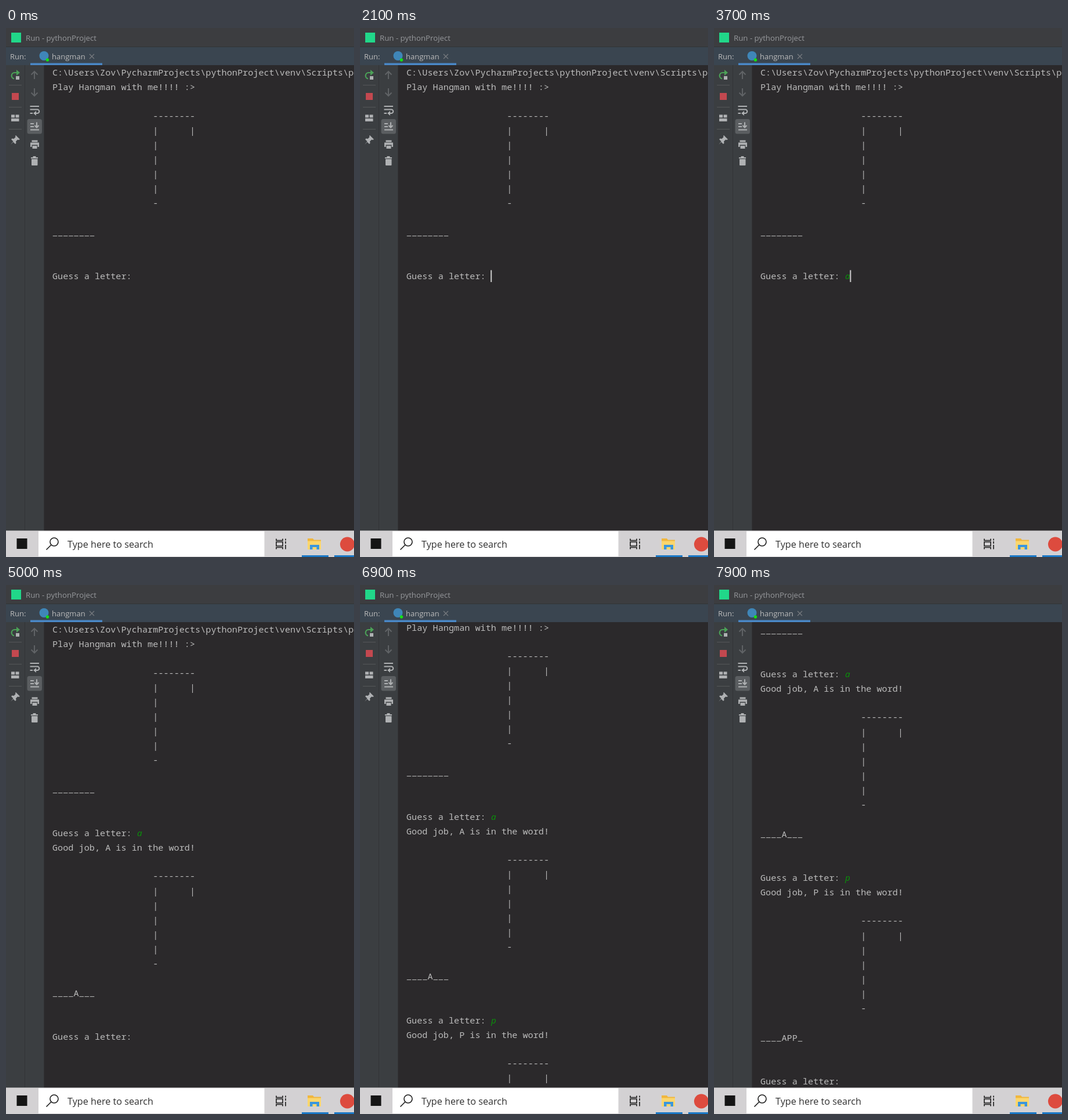
Recreate the animation shown at these times as an HTML page. Size 600 px wide and 912 px high, loop 8000 ms.

```html
<!DOCTYPE html>
<html lang="en">
<head>
<meta charset="utf-8">
<title>Hangman console</title>
<style>
  html, body { margin: 0; height: 100%; overflow: hidden; background: #3c3f41; }
  #stage { display: block; width: 100vw; height: 100vh; }
  text { white-space: pre; fill: #bbb; font: 13px "Open Sans", "Noto Sans", sans-serif; }
  #rows text { font: 15.2px "Noto Sans Mono", "DejaVu Sans Mono", monospace; }
  #rows .typed { fill: #0b8f0b; font: italic 15.2px "Noto Sans", sans-serif; }
  #rows .blank { font-size: 12.5px; letter-spacing: 1.62px; transform: translate(.8px, -1.5px); }
  #rows .gallows { transform: translateY(-1px); }
  .line { fill: none; stroke: #afb1b3; stroke-width: 2; }
  .solid { fill: #afb1b3; }
  .dim { stroke: #606366; }
</style>
</head>
<body>
<svg id="stage" viewBox="0 0 600 912">
  <!-- window frame -->
  <rect width="600" height="912" fill="#3b3e41"/>
  <rect width="600" height="33" fill="#3c3d40"/>
  <rect y="33" width="600" height="31" fill="#3a4550"/>
  <path d="M0 32.500H600M32.500 64V866" stroke="#323437"/>
  <rect x="9" y="8" width="17" height="17" fill="#21d789"/>
  <text x="34" y="22" style="font-size:13.25px;fill:#96989b">Run - pythonProject</text>
  <text x="7" y="54">Run:</text>
  <circle cx="65.5" cy="48" r="8" fill="#3f86b8"/>
  <circle cx="71.5" cy="55" r="2.7" fill="#14e014"/>
  <text x="79" y="54">hangman</text>
  <path d="M144 45l8 8m0-8l-8 8" stroke="#777b7f" stroke-width="1.2"/>
  <rect x="42" y="60.5" width="124" height="3.5" fill="#4a88c7"/>

  <!-- console -->
  <rect x="65.5" y="64" width="535" height="803" fill="#2b292b"/>
  <svg y="64" width="600" height="803" viewBox="0 64 600 803">
    <g id="rows"></g>
  </svg>

  <!-- tool buttons -->
  <path d="M5 98.500H27M5 136.500H27M5 174.500H27" stroke="#555759"/>
  <path d="M14 87.500A5.300 5.300 0 0 1 14.500 77H19" fill="none" stroke="#4ba157" stroke-width="2.2"/>
  <path d="M18 72l6 5-6 5z" fill="#4ba157"/>
  <rect x="17" y="83" width="6" height="6" class="solid"/>
  <rect x="10" y="112" width="12" height="12" fill="#c3484f"/>
  <path d="M9 149.500h6v5h-6zM16.500 149.500h6v5h-6zM9 156h13.500v5H9z" class="solid"/>
  <path d="M17 185l7 7-2 1-2-.5-3 3 .5 3-1.500 1.500-3.500-3.500L8 201l4.500-5.500L9 192l1.500-1.500 3 .5 3-3-.5-2z" class="solid"/>
  <path d="M49 88V75m-5.500 5.500L49 75l5.500 5.500M49 104v13m-5.500-5.500L49 117l5.500-5.500" class="line dim"/>
  <path d="M41.500 135H57M41.500 140.500H54a3 3 0 0 1 0 6.500H50M41.500 147H46" class="line"/>
  <path d="M52 143v8l-5-4z" class="solid"/>
  <rect x="36.5" y="157" width="25.5" height="25.5" rx="3.5" fill="#5b5e61"/>
  <path d="M42 165H48M42 170H48M42 175.500H57M53 162.500V171M49.500 168l3.500 3.500 3.500-3.500" class="line"/>
  <path d="M44.500 193.500h10v3h-10zM42 197.500h15v7.500h-2.500v-3.500h-10v3.500H42zM45.500 203h8v5h-8z" class="solid"/>
  <path d="M43 223h12v2H43zM46.500 221h5v2h-5zM44 226h10.500v10q0 1-1 1h-8.500q-1 0-1-1z" class="solid"/>

  <!-- taskbar -->
  <rect y="866.5" width="600" height="45.5" fill="#d3d1d3"/>
  <rect x="56" y="867.5" width="389.5" height="43.5" fill="#fff"/>
  <rect x="18.5" y="880" width="18" height="18" fill="#151515"/>
  <g fill="none" stroke="#1b1b1b" stroke-width="1.6">
    <circle cx="83" cy="886" r="7"/>
    <path d="M78 891l-8.500 8.500"/>
    <path d="M466 880.500v3h11v-3M466 886h11v7h-11zM466 898.500v-3h11v3M482 880.500v3M482 885v4M482 891v7.500"/>
  </g>
  <text x="106" y="896" style="font-size:16.2px;fill:#303030">Type here to search</text>
  <path d="M520 880h9l2 2.500h12V899h-23z" fill="#f0b73f"/>
  <path d="M520 884.500h23V899h-23z" fill="#fbd66d"/>
  <path d="M524 899v-8h16v8h-4.500v-4h-7v4z" fill="#3a96dd"/>
  <circle cx="588.5" cy="890" r="12.5" fill="#dd4b3e"/>
  <path d="M510 909h46v3h-46zM566 909h34v3h-34z" fill="#1b78c6"/>
</svg>
<script>
const LOOP = 8000, PITCH = 25.07, LEFT = 80, COLUMN = 9.12, PROMPT = 16;
const SCROLL = { start: 6800, length: 340, distance: 274 };
const NS = 'http://www.w3.org/2000/svg';
const rows = document.getElementById('rows');
const parts = [];

function add(name, attrs, from = 0) {
  const node = document.createElementNS(NS, name);
  for (const key in attrs) node.setAttribute(key, attrs[key]);
  rows.append(node);
  parts.push({ node, from });
  return node;
}

// Underscores are set apart from the letters between them.
function write(row, text, from, column = 0, style = '') {
  const y = 82.3 + row * PITCH;
  for (const run of text.match(/_+|[^_]+/g) || []) {
    const kind = run[0] === '_' ? 'blank' : style;
    add('text', { x: LEFT + column * COLUMN, y, class: kind }, from).textContent = run;
    column += run.length;
  }
}

// One round: message, gallows, word and prompt.
function round(row, message, word, from) {
  const gallows = ['--------', '|      |', '|', '|', '|', '|', '-'];
  write(row, message, from);
  gallows.forEach((line, i) => write(row + 2 + i, line, from, 19, 'gallows'));
  write(row + 10, word, from);
  write(row + 13, 'Guess a letter: ', from);
}

write(0, 'C:\\Users\\Zov\\PycharmProjects\\pythonProject\\venv\\Scripts\\python.exe', 0);
round(1, 'Play Hangman with me!!!! :>', '________', 0);
write(14, 'a', 3450, PROMPT, 'typed');
round(15, 'Good job, A is in the word!', '____A___', 4450);
write(28, 'p', 5950, PROMPT, 'typed');
round(29, 'Good job, P is in the word!', '____APP_', SCROLL.start);

const caret = add('rect', { width: 2, height: 20.5, fill: '#ccc' });

// Each caret position restarts the blink: time, row, letters typed.
const carets = [[50, 14, 0], [3450, 14, 1], [4450, 28, 0], [5950, 28, 1], [6950, 42, 0]];

const ease = u => u < .5 ? 4 * u ** 3 : 1 - 4 * (1 - u) ** 3;

function draw(t) {
  for (const { node, from } of parts) node.style.display = t < from ? 'none' : '';
  const spot = carets.filter(c => c[0] <= t).pop();
  const lit = spot && Math.floor((t - spot[0]) / 500) % 2 === 0;
  caret.style.display = lit ? '' : 'none';
  if (lit) {
    caret.setAttribute('x', LEFT - .7 + (PROMPT + spot[2]) * COLUMN);
    caret.setAttribute('y', 66.5 + spot[1] * PITCH);
  }
  const u = Math.min(1, Math.max(0, (t - SCROLL.start) / SCROLL.length));
  rows.setAttribute('transform', `translate(0 ${-SCROLL.distance * ease(u)})`);
}

const start = performance.now();
function tick() {
  draw((performance.now() - start) % LOOP);
  requestAnimationFrame(tick);
}
tick();
</script>
</body>
</html>
```
